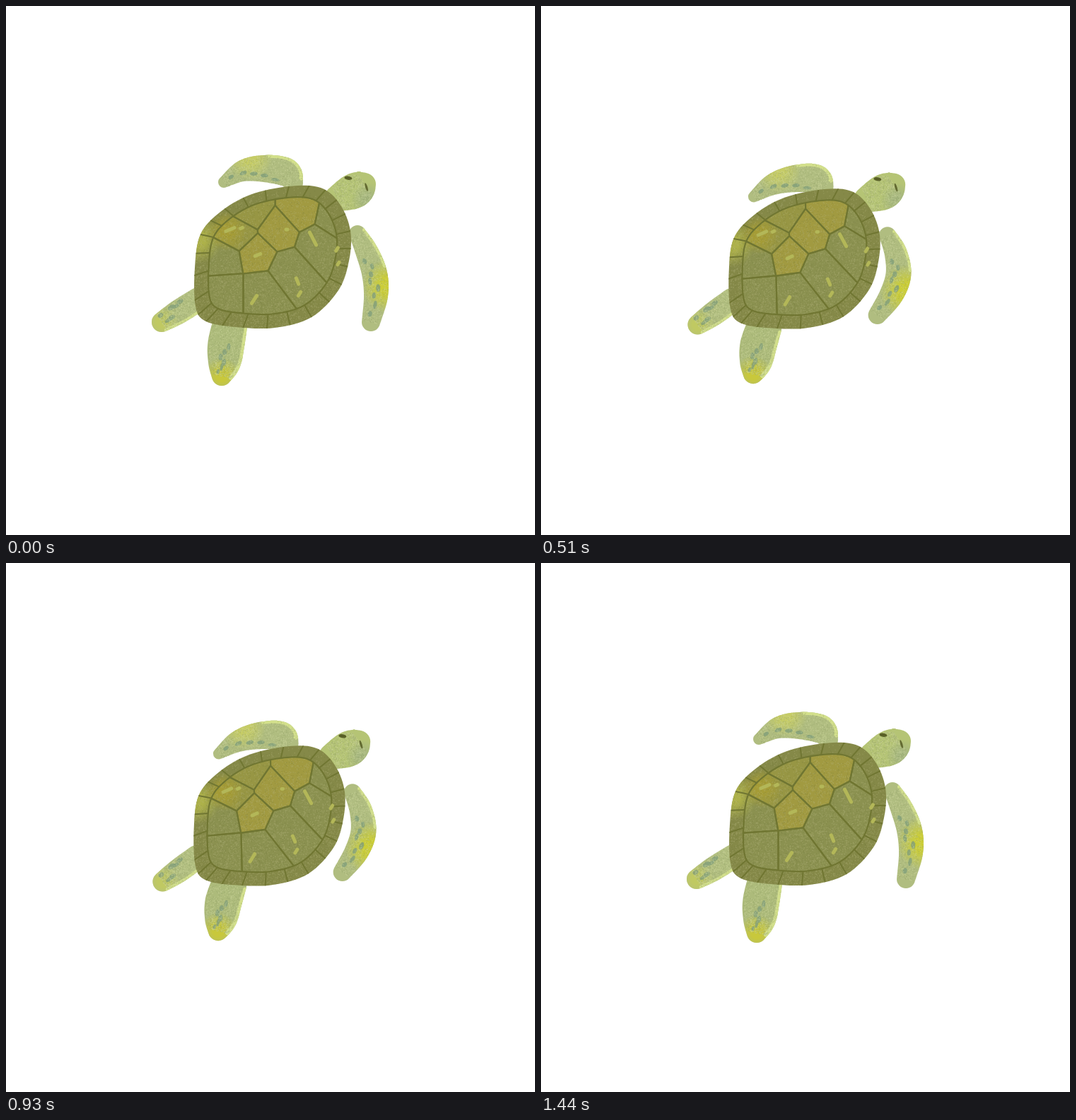
These frames come from a looping animation (748x748 px, 1470 ms). An HTML page with a canvas:

```html
<!DOCTYPE html>
<html>
<head>
<meta charset="utf-8">
<title>Swimming turtle</title>
<style>
html, body { margin: 0; height: 100%; overflow: hidden; background: #fff; }
canvas { display: block; }
</style>
</head>
<body>
<canvas id="stage" width="748" height="748"></canvas>
<script>
const ctx = document.getElementById('stage').getContext('2d');
const LOOP = 1470, TURN = 720, STEP = 30;
const SPOT = '#83a07bd0', LIME = '#d3e08b', SEAM = '#707632';
const LIGHT = '#d0d8a080', DARK = '#88986058';
const OLIVE = '#8b9150', GOLD = '#a19a41', KHAKI = '#979644';

// Each limb runs from base to tip. Joint: x, y spread, then x, y gathered, and radius.
// Tint: place along, place across, radius, colour.
const limbs = [
  { joints: [[407, 250, 398, 257, 13], [396, 235, 386, 248, 20], [365, 230, 356, 250, 19], [335, 233, 325, 260, 15], [308, 249, 298, 278, 8]],
    fill: '#b0bd80', side: 1, rim: 0.45, tint: [0.65, 1, 32, '#c6cc66'], spots: 5 },
  { joints: [[497, 322, 487, 325, 12], [510, 347, 498, 350, 16], [521, 378, 499, 380, 18], [523, 410, 484, 408, 17], [516, 447, 459, 433, 13]],
    fill: '#b0bd80', side: -1, rim: 0.45, tint: [0.65, -1, 38, '#cbcd38'], spots: 8 },
  { joints: [[272, 415, 270, 416, 17], [243, 433, 244, 436, 17], [220, 447, 222, 452, 14]],
    fill: '#b2bf80', side: -1, rim: 1, tint: [1, 0, 24, '#c0c962'], spots: 6 },
  { joints: [[316, 453, 315, 455, 25], [311, 480, 306, 479, 26], [309, 503, 302, 501, 23], [305, 523, 298, 519, 14]],
    fill: '#adbb7b', side: -1, rim: 1, tint: [1, 0, 26, '#c8c83c'], spots: 6 },
  { joints: [[468, 272, 457, 274, 18], [493, 261, 482, 263, 25], [507, 252, 496, 253, 16]],
    fill: '#b5c475', side: 1, rim: 0, tint: [0.7, 0.9, 24, '#a6b77f'], spots: 0, face: true }
];

const shellRim = [
  [400, 255], [445, 257], [472, 280], [487, 318], [485, 360], [470, 402], [432, 440], [380, 455],
  [325, 454], [283, 446], [268, 425], [267, 370], [275, 323], [302, 292], [345, 267]
];
const scutes = [
  [416, 290, GOLD], [385, 318, GOLD], [354, 350, GOLD], [345, 289, KHAKI], [327, 322, KHAKI], [308, 358, OLIVE],
  [311, 402, OLIVE], [360, 402, OLIVE], [400, 372, OLIVE], [440, 336, OLIVE], [463, 300, OLIVE]
];
// x, y, angle, length
const shines = [[317, 316, -0.4, 13], [333, 314, -0.4, 3], [397, 316, 0, 2], [356, 352, -0.4, 8], [351, 415, -1, 13],
  [412, 389, 1.2, 9], [415, 407, -1, 6], [434, 329, 1.1, 20], [468, 344, -1, 5], [470, 364, -1, 4]];

let seed = 7;
const random = () => (seed = seed * 16807 % 2147483647) / 2147483647;
const many = (count, make) => Array.from({ length: count }, (_, i) => make(i));
const mix = (a, b, t) => a + (b - a) * t;

for (const limb of limbs) {
  limb.marks = many(limb.spots, i => ({
    u: 0.3 + 0.65 * (i + 0.5) / limb.spots, v: -limb.side * 0.25 + (random() - 0.5) * 0.9,
    long: 3.5 + random() * 2.5, wide: 2 + random() * 1.3
  }));
  limb.grain = many(900, () => [random(), random() * 2 - 1]);
}
const shellGrain = many(8000, () => [265 + 225 * random(), 255 + 205 * Math.pow(random(), 0.7)]);

// Catmull-Rom curve through points of any dimension, t from 0 to 1.
function spline(points, t, closed) {
  const count = points.length, spans = closed ? count : count - 1;
  const i = Math.min(Math.floor(t * spans), spans - 1), f = t * spans - i;
  const at = k => points[closed ? (k + count) % count : Math.max(0, Math.min(count - 1, k))];
  const [a, b, c, d] = [at(i - 1), at(i), at(i + 1), at(i + 2)];
  return b.map((q, k) => q + 0.5 * f * (c[k] - a[k] + f * (2 * a[k] - 5 * q + 4 * c[k] - d[k] + f * (3 * (q - c[k]) + d[k] - a[k]))));
}

function path(points, closed) {
  ctx.beginPath();
  for (const [x, y] of points) ctx.lineTo(x, y);
  if (closed) ctx.closePath();
}

function stroke(points, width, color, closed) {
  path(points, closed);
  ctx.lineWidth = width;
  ctx.strokeStyle = color;
  ctx.stroke();
}

function ellipse([x, y], rx, ry, tilt, color) {
  ctx.beginPath();
  ctx.ellipse(x, y, rx, ry, tilt, 0, Math.PI * 2);
  ctx.fillStyle = color;
  ctx.fill();
}

function glow([x, y], radius, color) {
  const fade = ctx.createRadialGradient(x, y, radius * 0.3, x, y, radius);
  fade.addColorStop(0, color);
  fade.addColorStop(1, color + '00');
  ellipse([x, y], radius, radius, 0, fade);
}

function speckle(points, color) {
  ctx.beginPath();
  for (const [x, y] of points) ctx.rect(x, y, 1.2, 1.2);
  ctx.fillStyle = color;
  ctx.fill();
}

function drawLimb(limb, phase) {
  const joints = limb.joints.map(([x0, y0, x1, y1, r]) => [mix(x0, x1, phase), mix(y0, y1, phase), r]);
  const angleAt = u => {
    const [ax, ay] = spline(joints, Math.max(0, u - 0.02)), [bx, by] = spline(joints, Math.min(1, u + 0.02));
    return Math.atan2(by - ay, bx - ax);
  };
  // u runs along the limb, v from edge to edge
  const place = (u, v) => {
    const [x, y, r] = spline(joints, u), angle = angleAt(u);
    return [x - Math.sin(angle) * r * v, y + Math.cos(angle) * r * v];
  };
  ctx.save();
  ctx.beginPath();
  for (let i = 0; i <= 80; i++) {
    const [x, y, r] = spline(joints, i / 80);
    ctx.moveTo(x + r, y);
    ctx.arc(x, y, r, 0, Math.PI * 2);
  }
  ctx.fillStyle = limb.fill;
  ctx.fill();
  ctx.clip();
  const [u, v, radius, color] = limb.tint;
  glow(place(u, v), radius, color);
  if (limb.rim) stroke(many(20, i => place(limb.rim * i / 19, limb.side * 0.95)), 6, LIME);
  for (const { u, v, long, wide } of limb.marks) ellipse(place(u, v), long, wide, angleAt(u), SPOT);
  const grain = limb.grain.map(([u, v]) => place(u, v));
  speckle(grain.slice(0, 500), LIGHT);
  speckle(grain.slice(500), DARK);
  if (limb.face) {
    ellipse(place(0.5, -0.8), 5.5, 2.6, 0.15, '#596027');
    ellipse(place(1, 0.3), 1.6, 6, -0.3, '#636b31');
  }
  ctx.restore();
}

const rimAt = t => spline(shellRim, t, true);
const inward = ([x, y]) => [mix(377, x, 0.82), mix(345, y, 0.82)];
const rim = many(120, i => rimAt(i / 120));

// Part of the inner shell that lies nearer to one scute centre than to any other.
function cell([cx, cy]) {
  let shape = rim.map(inward);
  for (const [ox, oy] of scutes) {
    if (ox === cx && oy === cy) continue;
    const beyond = ([x, y]) => (x - (cx + ox) / 2) * (ox - cx) + (y - (cy + oy) / 2) * (oy - cy);
    shape = shape.flatMap((point, i) => {
      const next = shape[(i + 1) % shape.length], a = beyond(point), b = beyond(next);
      const kept = a <= 0 ? [point] : [];
      if (a * b < 0) kept.push(point.map((q, k) => mix(q, next[k], a / (a - b))));
      return kept;
    });
  }
  return shape;
}
const cells = scutes.map(cell);

function drawShell() {
  ctx.save();
  path(rim, true);
  ctx.fillStyle = '#858948';
  ctx.fill();
  ctx.clip();
  cells.forEach((shape, i) => {
    path(shape, true);
    ctx.fillStyle = scutes[i][2];
    ctx.fill();
  });
  glow([272, 330], 34, '#adb14a');
  glow([312, 318], 28, '#a59c36');
  speckle(shellGrain.slice(0, 5000), '#b5b68060');
  speckle(shellGrain.slice(5000), '#686f3440');
  for (const shape of cells) stroke(shape, 2.2, SEAM, true);
  for (let i = 0; i < 25; i++) {
    const edge = rimAt(i / 25);
    stroke([edge, inward(edge)], 2, SEAM);
  }
  for (const [x, y, angle, length] of shines) {
    const dx = Math.cos(angle) * length / 2, dy = Math.sin(angle) * length / 2;
    stroke([[x - dx, y - dy], [x + dx, y + dy]], 5, '#b3b758');
  }
  ctx.restore();
}

function draw(time) {
  const phase = 1 - Math.abs(Math.min(time, 2 * TURN) - TURN) / TURN;
  ctx.setTransform(1, 0, 0, 1, 0, 0);
  ctx.fillStyle = '#fff';
  ctx.fillRect(0, 0, 748, 748);
  ctx.lineCap = ctx.lineJoin = 'round';
  for (const limb of limbs) drawLimb(limb, phase);
  // The shell leans and shrinks slightly with each stroke.
  ctx.setTransform(1 - 0.04 * phase, -0.0327 * phase, 0.032 * phase, 1 - 0.038 * phase, -3 * phase, 29.8 * phase);
  drawShell();
}

const start = performance.now();
let shown = -1;
function tick() {
  const time = Math.floor((performance.now() - start) % LOOP / STEP) * STEP;
  if (time !== shown) draw(shown = time);
  requestAnimationFrame(tick);
}
tick();
</script>
</body>
</html>
```
